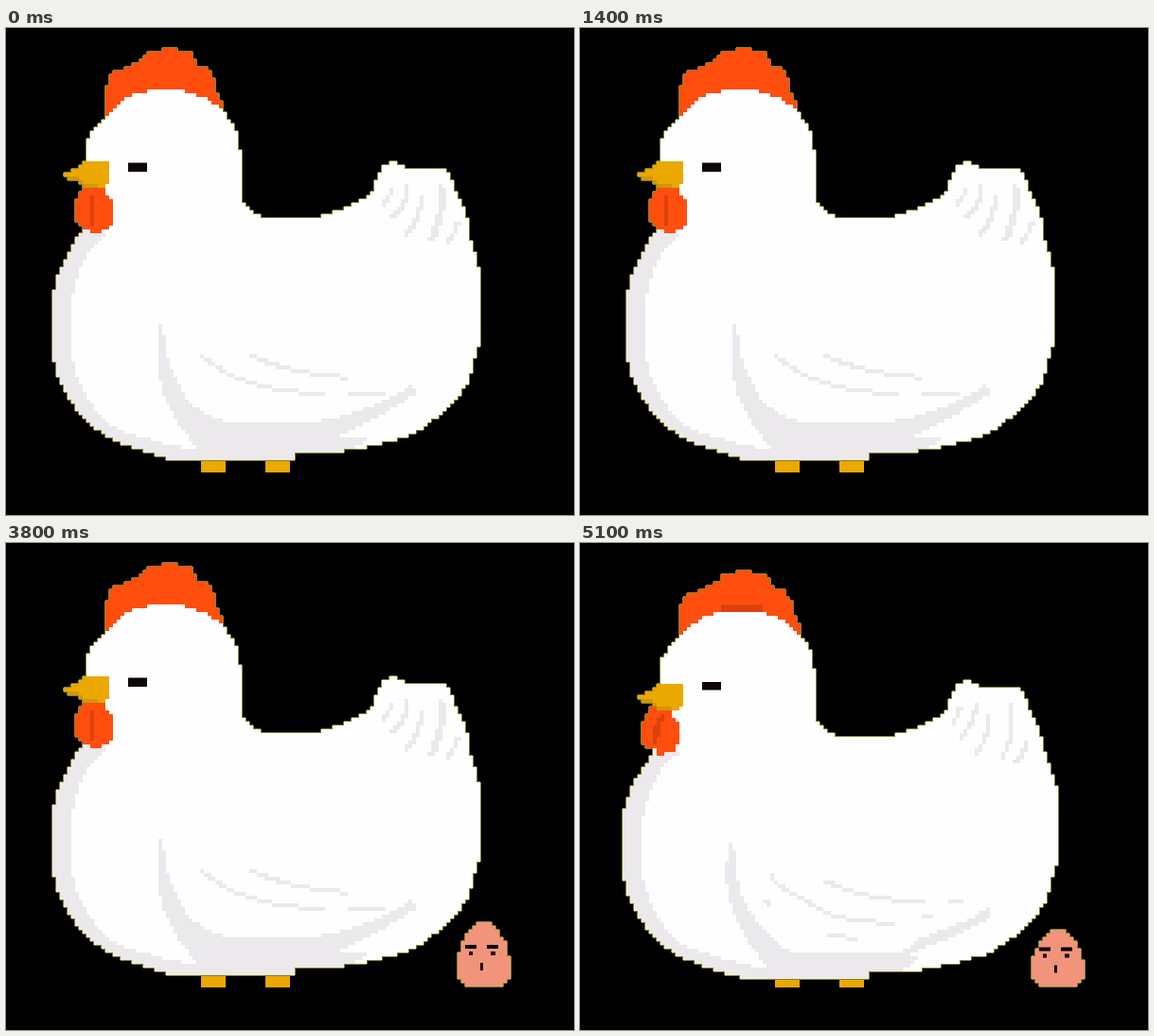
These frames come from a looping animation (600 by 515 pixels, 5200 ms). An HTML page with a canvas:

```html
<!DOCTYPE html>
<html lang="en">
<head>
<meta charset="utf-8">
<title>Hen and egg</title>
<style>
  html, body { margin: 0; width: 100%; height: 100%; overflow: hidden; background: #000; }
  canvas { display: block; }
</style>
</head>
<body>
<canvas id="stage" width="600" height="515"></canvas>
<script>
const W = 600, H = 515, CELL = 4;
const RED = '#ff4e0e', DARK_RED = '#dd420c', GOLD = '#eaa800', DARK_GOLD = '#d4950a';
const WHITE = '#fefdff', SHADE = '#ebe9eb', INK = '#0c0606', FRINGE = '#84822a';

const BODY = 'M84,140 L84,123 Q90,108 108,93 Q125,66 168,65 Q208,66 229,88 Q246,108 247,128 L247,178 ' +
  'Q251,190 271,201 L322,201 Q366,193 389,172 Q392,152 402,144 Q411,138 424,151 L464,151 Q471,158 475,172 ' +
  'Q489,196 490,222 Q501,250 501,270 L501,328 Q492,362 487,377 Q464,410 428,430 Q390,443 345,449 ' +
  'L306,451 L306,455 L170,455 Q115,440 92,422 Q70,403 56,371 Q49,352 49,335 L49,290 Q53,260 64,243 Q76,222 84,205 Z';
const COMB = 'M107,95 L107,60 112,47 126,43 131,43 134,38 146,32 149,27 162,25 166,21 178,21 182,27 195,26 ' +
  '199,32 202,40 213,41 217,52 222,58 222,67 228,78 228,90 170,100 Z';
const COMB_SHADE = 'M150,60 L193,60 193,75 150,75 Z';
const BEAK = 'M62,155 L68,151 75,149 82,143 86,140 104,140 110,146 110,160 104,167 96,170 84,168 76,161 64,160 Z';
const BEAK_SHADE = 'M64,157 L76,157 84,164 98,165 96,170 84,168 76,161 64,160 Z';
const WATTLE = 'M82,167 L104,167 106,176 112,182 114,190 113,206 108,212 100,214 98,217 90,216 88,212 78,210 74,202 74,186 77,176 Z';
const BREAST = 'M60,212 L107,217 Q73,240 69,300 L69,342 Q74,385 108,419 Q145,437 206,447 L206,470 L20,470 L20,240 Z';
const WINGS = [
  'M161,311 L167,320 Q166,350 187,386 Q204,410 238,417 L325,417 Q392,404 430,376 L433,386 Q400,410 345,434 ' +
  'L385,433 L345,460 L170,460 L205,447 Q160,400 160,345 Z',
  'M160,311 L167,323 Q164,365 187,393 Q205,421 228,429 L325,429 Q352,427 356,414 Q400,401 431,380 L431,391 Q405,410 345,430 ' +
  'L357,436 L345,446 L300,460 L170,460 L200,444 Q156,395 156,340 Z'
];
const FEATHERS = [
  'M207,346 Q246,384 336,387 M256,344 Q290,364 363,370 M362,388 L402,387',
  'M203,346 L207,356 Q236,372 262,388 Q290,397 331,398 M256,352 Q300,374 365,376 M385,374 L402,373 ' +
  'M360,391 L372,391 M263,411 L292,414 M194,374 L202,378'
];
const TAIL = 'M408,168 Q405,178 399,187 M424,167 Q424,186 407,202 M438,178 Q438,204 422,219 M477,206 Q473,222 463,230';
const TAIL_THICK = 'M459,167 Q464,200 447,226';
const EGG = 'M498,401 L513,401 Q521,412 526,420 Q532,434 532,444 L532,459 L523,470 L486,470 L477,459 L477,442 Q480,426 487,415 Z';

const clamp = v => Math.max(0, Math.min(1, v));

function layer() {
  const c = document.createElement('canvas');
  c.width = W;
  c.height = H;
  return c.getContext('2d');
}

const mapPath = (path, move) =>
  new Path2D(path.replace(/([\d.]+),([\d.]+)/g, (_, x, y) => move(+x, +y).join()));

// Fills every grid cell whose centre passes the test.
function fillCells(g, color, inside) {
  g.fillStyle = color;
  for (let y = 1; y < H; y += CELL)
    for (let x = 1; x < W; x += CELL)
      if (inside(x + CELL / 2, y + CELL / 2)) g.fillRect(x, y, CELL, CELL);
}

function fringed(sprite) {
  const g = layer();
  for (const [dx, dy] of [[1, 0], [-1, 0], [0, 1], [0, -1]]) g.drawImage(sprite, dx, dy);
  g.globalCompositeOperation = 'source-in';
  g.fillStyle = FRINGE;
  g.fillRect(0, 0, W, H);
  g.globalCompositeOperation = 'source-over';
  g.drawImage(sprite, 0, 0);
  return g.canvas;
}

// squash: 0 = tall, 1 = sinking, 2 = lowest
function makeHen(squash) {
  const g = layer();
  const warp = (dx = 0, dy = 0) => (x, y) => [
    x + squash * (dx + 4 * clamp((y - 200) / 60) * (x - 275) / 226),
    y + squash * (4 + dy + (x < 260 ? 4 * clamp((120 - y) / 100) : 0))
  ];
  const shape = (path, color, move = warp(), clip) => {
    const p = mapPath(path, move);
    fillCells(g, color, (x, y) => g.isPointInPath(p, x, y) && (!clip || g.isPointInPath(clip, x, y)));
  };
  const line = (path, width, move = warp()) => {
    const p = mapPath(path, move);
    g.lineWidth = width;
    fillCells(g, SHADE, (x, y) => g.isPointInStroke(p, x, y));
  };
  const body = mapPath(BODY, warp());
  const low = squash ? 1 : 0;

  shape(COMB, RED, (x, y) => {
    const [, wy] = warp()(x, y);
    return [x + squash * 3 * (x - 107) / 121, wy];
  });
  if (squash) shape(COMB_SHADE, DARK_RED);
  shape(BODY, WHITE);
  shape(BREAST, SHADE, warp(), body);
  shape(WINGS[low], SHADE, warp(), body);
  line(FEATHERS[low], 4);
  line(TAIL, 4.5, warp(-6));
  line(TAIL_THICK, squash ? 4.5 : 7, warp(-4));
  shape(WATTLE, RED, warp(-8, 3));
  shape(squash ? 'M92,176 L96,176 90,204 84,204 84,192 Z' : 'M89,177 L93,177 93,209 89,209 Z', DARK_RED, warp(-8, 3));
  shape(BEAK, GOLD, warp(0, 4));
  shape(BEAK_SHADE, DARK_GOLD, warp(0, 4));
  return fringed(g.canvas);
}

function makeEgg(squash) {
  const g = layer();
  const wide = squash === 2 ? 1.16 : 1;
  const p = mapPath(EGG, (x, y) => [504.5 + (x - 504.5) * wide, 471 - (471 - y) * (1 - 0.11 * squash)]);
  fillCells(g, '#f1947b', (x, y) => g.isPointInPath(p, x, y));
  const face = fringed(g.canvas).getContext('2d');
  face.fillStyle = INK;
  face.translate(0, 2.5 * squash);
  for (const r of [[485, 425, 12, 4], [508, 425, 12, 4], [489, 432, 4, 4], [512, 432, 5, 4], [501, 444, 3, 8]])
    face.fillRect(...r);
  return face.canvas;
}

const hens = [0, 1, 2].map(makeHen);
const eggs = [0, 1, 2].map(makeEgg);
const stage = document.getElementById('stage').getContext('2d');
const BREATH = [0, 1, 2, 1, 0];

function rect(color, ...r) {
  stage.fillStyle = color;
  stage.fillRect(...r);
}

function draw(now) {
  const step = Math.floor(now / 100) % 52;
  const startled = step >= 20 && step < 33;
  const squash = startled ? 0 : BREATH[(step < 20 ? step : step - 33) % 5];

  rect('#000', 0, 0, W, H);
  rect(GOLD, 206, 450, 26, 20);
  rect(GOLD, 274, 450, 26, 20);
  stage.drawImage(hens[squash], 0, 0);
  if (startled) {
    rect('#000', 128, 128, 26, 31);
    rect('#000', 125, 131, 32, 26);
    rect(WHITE, 133, 135, 15, 18);
  } else {
    rect(INK, 129, 142.5 + 4.5 * squash, 20, squash ? 8.5 : 9.5);
  }
  if (step >= 22) stage.drawImage(eggs[startled ? 1 : squash], 0, 0);
  requestAnimationFrame(draw);
}
requestAnimationFrame(draw);
</script>
</body>
</html>
```
